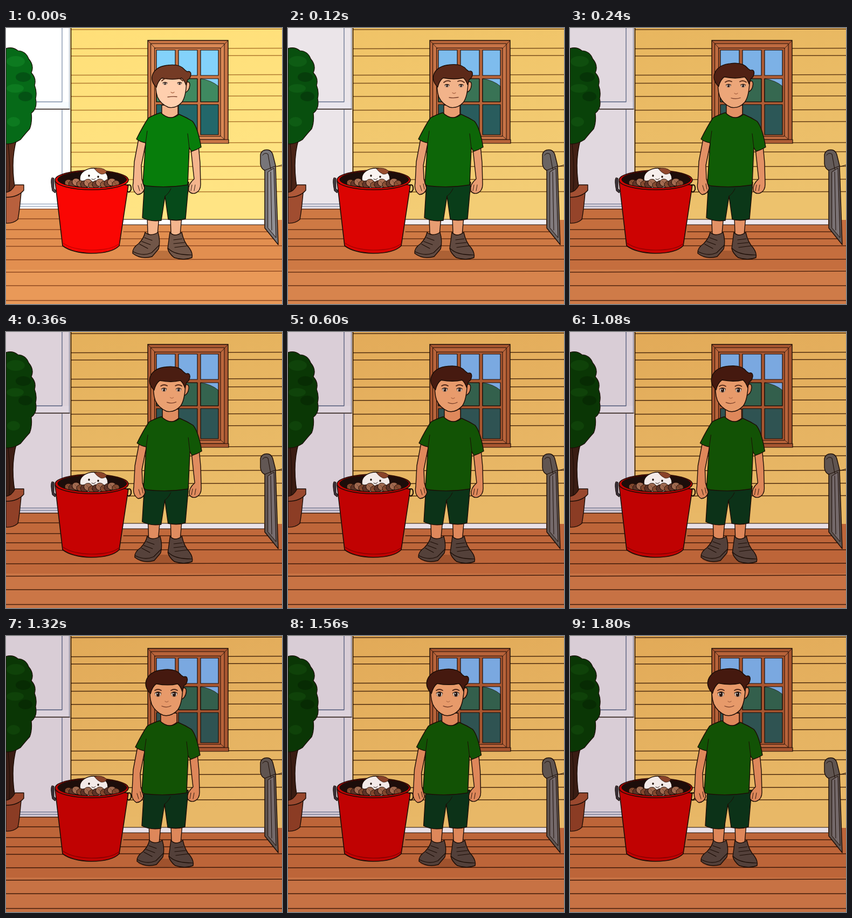
An HTML page with a canvas for the animation above (1920 ms loop, 512 by 512 pixels).

```html
<!DOCTYPE html>
<html lang="en">
<head>
<meta charset="utf-8">
<style>
  html, body { margin: 0; width: 100%; height: 100%; overflow: hidden; }
  canvas { display: block; width: 512px; height: 512px; }
</style>
</head>
<body>
<canvas id="stage" width="512" height="512"></canvas>
<script>
const start = performance.now();
const g = document.getElementById('stage').getContext('2d');
const INK = '#1c0d06', STEP = 120, COUNT = 16;
let step = 0, dusk = 0;

// Poses are given at these steps; a smooth curve runs through them.
const KEYS = [0, 1, 2, 5, 8, 11, 15];
const TRACKS = {
  headX:   [307, 306, 304.5, 303, 302, 298, 295],
  headW:   [1, 1.01, 1.03, 1.05, 1.06, 1.07, 1.09],
  headH:   [1, 1.01, 1.04, 1.07, 1.07, 1.08, 1.1],
  eyeL:    [295, 295, 294, 291, 284, 282, 280],
  eyeR:    [322, 321, 321, 318, 313, 312, 311],
  eyeY:    [103, 107, 107, 107, 107.5, 108, 108],
  eyeSize: [2, 2.2, 2.5, 3, 3.5, 3.8, 4],
  mouthX:  [309, 308, 308, 306, 299, 298, 296],
  mouthY:  [128, 129, 130, 131, 131, 130, 130],
  smile:   [-1, 1, 2, 3, 3, 3, 3],
  bodyX:   [0, 0, 1, 1, 0, -2, -5],
  shortsX: [0, 0, 0, -1, -1, -1, -2],
  shoeL:   [0, 0, 2, 7, 8, 8, 8],
  shoeR:   [0, 0, 0, 1, 1, 2, 2]
};

function at(name) {
  const v = TRACKS[name], last = KEYS.length - 1;
  let i = 0;
  while (i < last - 1 && step > KEYS[i + 1]) i++;
  const slope = j => {
    const a = Math.max(j - 1, 0), b = Math.min(j + 1, last);
    return (v[b] - v[a]) / (KEYS[b] - KEYS[a]);
  };
  const span = KEYS[i + 1] - KEYS[i], t = (step - KEYS[i]) / span, u = 1 - t;
  return v[i] * u * u * (1 + 2 * t) + v[i + 1] * t * t * (3 - 2 * t)
    + span * t * u * (slope(i) * u - slope(i + 1) * t);
}

// Blend from the bright to the dim version of a colour.
function tone(bright, dim) {
  const part = (hex, i) => parseInt(hex.substr(1 + 2 * i, 2), 16);
  return `rgb(${[0, 1, 2].map(i =>
    Math.round(part(bright, i) + (part(dim, i) - part(bright, i)) * dusk))})`;
}

function shape(d, fill, width = 1.4, ink = INK) {
  const p = new Path2D(d);
  if (fill) { g.fillStyle = fill; g.fill(p); }
  if (width) { g.lineWidth = width; g.strokeStyle = ink; g.stroke(p); }
}
const line = (d, ink = INK, width = 1.2) => shape(d, null, width, ink);

function rect(x, y, w, h, fill, width = 0, ink = INK) {
  shape(`M${x} ${y}h${w}v${h}h${-w}Z`, fill, width, ink);
}

function oval(x, y, rx, ry, fill, width = 0, turn = 0) {
  g.beginPath();
  g.ellipse(x, y, rx, ry, turn, 0, 7);
  g.fillStyle = fill;
  g.fill();
  if (width) { g.lineWidth = width; g.strokeStyle = INK; g.stroke(); }
}

function moved(dx, draw) {
  g.save();
  g.translate(dx, 0);
  draw();
  g.restore();
}

function house() {
  const wall = g.createLinearGradient(120, 0, 200, 360);
  wall.addColorStop(0, tone('#ffdf78', '#e2aa58'));
  wall.addColorStop(1, tone('#ffe484', '#e8b867'));
  rect(0, 0, 512, 365, wall);
  const seam = tone('#b07a30', '#4c2a0e');
  for (const y of [2.5, 38, 51.5, 87, 102, 126.5, 152, 174, 213, 230, 257, 281, 304])
    line(`M121 ${y + .5}L512 ${y - .5}`, seam, 1.3);

  rect(0, 0, 119, 336, tone('#ffffff', '#d9cdd6'));
  rect(0, 137, 118, 15, tone('#f8fcff', '#ddd3dc'));
  const edge = tone('#7d8ea8', '#4f5878');
  line('M104 0V137H0M104 152V327', edge, 1.3);
  line('M0 150.5H118M120.5 0V330', INK, 1.5);
  line('M117.5 0V150', edge, .8);
  rect(0, 327, 119, 9, tone('#f8fbff', '#d4cad4'));
  line('M25 326.5H119M25 331H119', edge, 1);
}

function deck() {
  rect(0, 336, 512, 176, tone('#e28f50', '#bd6539'));
  rect(0, 448, 512, 64, tone('#e99958', '#c77244'));
  rect(217, 336, 295, 20, tone('#ffe484', '#e8b867'));
  rect(478, 356, 34, 10, tone('#e28f50', '#bd6539'));
  rect(217, 355, 262, 10, tone('#ffffff', '#e9e0e6'));
  line('M217 355H479M217 365H479', INK, 1.2);
  const seam = tone('#8f4820', '#3f1a0a');
  line('M0 336H100M0 354H98M0 374H105M218 378H486M0 391H104M212 391H498M0 405H106M210 404H512M0 430L512 429M0 453L512 451M0 478H512M0 505.5H512', seam, 1.3);
}

function windowFrame() {
  const wood = tone('#c97545', '#a85630');
  rect(263, 23, 149, 190, wood, 1.4);
  rect(269, 29, 136, 178, tone('#d98855', '#b8633a'), 1);
  rect(276, 37, 122, 164, wood, 1);
  line('M263 23L277 38M412 23L398 38M263 213L277 200M412 213L398 200', INK, .8);
  rect(258, 207, 155, 7, wood, 1.2);
  const sky = tone('#83d2fb', '#7aa8e0');
  const hill = tone('#3f8960', '#335f4c');
  const low = tone('#22676a', '#2f5352');
  for (const [x, w] of [[279, 35], [320, 35], [361, 33]]) {
    rect(x, 41, w, 47, sky, 1.2);
    rect(x, 94, w, 43, sky);
    shape(x > 350 ? 'M361 94Q381 97 394 108V137H361Z' : `M${x} 94h${w}v43h${-w}Z`, hill, .7);
    rect(x, 94, w, 43, null, 1.2);
    rect(x, 142, w, 56, low, 1.2);
  }
}

function tree() {
  shape('M0 200L20 205Q13 230 13 255Q13 285 19 306H0Z', tone('#5c2d1c', '#3a1c13'));
  line('M4 215Q9 260 6 303', INK, 1);
  const clay = tone('#b8603d', '#8b3c24');
  shape('M0 306L28 306Q25 340 22 355Q13 363 0 362Z', clay);
  shape('M0 305Q10 304 17 291H33V301Q22 314 0 314Z', tone('#c76c45', '#99482e'));
  shape('M0 38Q12 34 22 42Q37 43 42 57Q53 70 47 83Q57 94 53 106Q58 119 55 131Q59 149 47 158Q49 174 44 187Q34 198 27 207Q13 216 0 215Z',
    tone('#066a18', '#0a3605'), 1.2);
  const leaf = tone('#0d7a20', '#0f4209'), shade = tone('#045214', '#072b03');
  [[18, 62, 17, 10], [32, 91, 14, 9], [17, 112, 16, 8], [36, 127, 13, 9], [14, 174, 12, 9]]
    .forEach(([x, y, a, b], i) => oval(x, y, a, b, i % 2 ? shade : leaf));
}

function gate() {
  line('M502 257L512 254', INK, 1);
  const steel = tone('#777579', '#5f5450');
  shape('M472 235Q474 226 484 226Q492 226 495 235L500 255L505 402L480 371V264Q473 261 472 252Z', steel);
  shape('M486 267L497 260L501 389L486 371Z', tone('#919095', '#74696a'), 1);
  line('M476 236Q480 230 486 234L491 262M480 264L500 256M491 267L493 375', INK, 1);
}

function bucket() {
  const red = tone('#fa0603', '#c00202');
  shape('M91 284L105 404Q122 417 158 418Q196 418 210 404L227 291Z', red, 1.6);
  line('M106 399Q122 411 158 412Q196 412 210 400', tone('#c00000', '#7c0000'), 1.2);
  oval(159, 282, 68, 18, red, 1.6);

  g.save();
  oval(160, 281, 64, 15.5, '#1d0d0a', 1);
  // Contents may rise above the rim but never spill over its front.
  g.clip(new Path2D('M96 240H224V281A64 15.5 0 0 1 96 281Z'));
  oval(163, 279, 26, 19, tone('#fffefa', '#f3eae8'), 1.3);
  shape('M164 261Q178 257 187 266Q184 272 176 271Q169 268 164 261Z', tone('#a85a36', '#8a432a'), .7);
  oval(154, 274, 1.7, 2, INK);
  oval(171, 276, 1.7, 2, INK);
  line('M159 280Q163 283 166 279', INK, 1);

  const nuts = [tone('#9a5c3e', '#84492f'), tone('#744030', '#5e3428'), tone('#b7785b', '#a06a50')];
  for (let i = 0; i < 13; i++) {
    const x = 116 + i * 7.3, y = 290 + 2 * Math.sin(i * 2.2) - Math.abs(i - 6) * .5;
    oval(x, y, 7, 6 + i % 3, nuts[i % 3], .9, i);
    line(`M${x - 3} ${y - 3}L${x + 2} ${y + 3}`, 'rgba(35,15,10,.5)', .8);
  }
  g.restore();
  line('M96 281A64 15.5 0 0 0 224 281', INK, 1);

  shape('M85 278Q82 282 86 302L91 306L93 302L89 298V279Z', tone('#474047', '#383038'), 1);
  line('M225 292Q233 288 232 300Q228 307 226 303', INK, 2);
}

function shoe(left) {
  const leather = tone('#715648', '#53403a');
  if (left) {
    shape('M258 379Q268 388 282 379Q287 396 283 410L271 424Q250 430 235 418Q234 408 246 400Q256 390 258 379Z', leather);
    line('M236 415Q254 424 270 417L284 403M257 389L271 394M252 396L268 402M248 401L263 409', INK, 1.2);
  } else {
    shape('M304 379Q313 389 326 379Q330 398 340 408Q347 418 345 426Q330 432 312 426Q302 418 300 409Z', leather);
    line('M301 409Q312 421 344 421M311 393L327 391M311 400L331 398M313 407L337 404', INK, 1.2);
  }
}

function boy() {
  const skin = tone('#f4b58d', '#de875a');
  const fair = tone('#ffcfae', '#e79a6a');
  oval(290, 421, 45, 8, 'rgba(70,25,8,.25)');
  moved(at('shoeL') * .4, () => shape('M262 350H284L281 383Q270 388 263 381Z', skin));
  moved(at('shoeR') * .5, () => shape('M305 350H326L323 384Q313 389 306 381Z', skin));
  moved(at('shoeL'), () => shoe(true));
  moved(at('shoeR'), () => shoe(false));

  moved(at('shortsX'), () => {
    shape('M257 286L253 352Q268 360 288 357L295 312L301 355Q318 359 333 354L339 286Z', tone('#064a1a', '#0c3218'));
    line('M295 312Q302 307 306 298', INK, 1);
  });

  moved(at('bodyX'), () => {
    shape('M246 206L238 248L236 287Q233 302 244 309Q255 308 257 297L252 280L251 255L260 210Z', skin);
    shape('M343 224L347 262L349 280Q337 290 339 302Q344 309 352 306Q361 302 361 290L360 250L357 218Z', skin);
    line('M245 292L248 302M251 289L253 299M345 291L343 302M351 291L349 302', INK, .9);
    shape('M289 143V160Q304 173 319 160V143Z', skin);
    shape('M287 157Q272 162 264 167Q254 182 242 206Q250 212 259 213L254 287Q254 292 262 293Q300 297 337 291L340 222L344 229Q354 226 362 221Q356 185 346 173Q335 166 321 160Q305 174 287 157Z',
      tone('#077d0b', '#125205'));
    line('M259 213L262 191M340 222L337 196', INK, 1);
  });
  head(skin, fair);
}

function head(skin, fair) {
  g.save();
  g.translate(at('headX'), 147);
  g.scale(at('headW'), at('headH'));
  g.translate(-307, -147);
  shape('M331 103Q341 96 341 106Q340 118 331 120Z', skin);
  shape('M279 95Q276 114 281 128Q287 141 301 147Q315 150 326 138Q334 128 335 98Q318 83 288 87Z', fair);
  shape('M279 110C270 101 269 92 273 84Q280 71 300 69Q323 66 332 78L336 81Q343 79 343 86Q342 94 337 96L334 106Q331 97 326 93Q310 97 289 93Q282 98 279 110Z',
    tone('#753b25', '#45190f'));
  g.restore();

  const y = at('eyeY'), r = at('eyeSize');
  for (const [x, side] of [[at('eyeL'), -1], [at('eyeR'), 1]]) {
    oval(x, y, r + 1.5, r * 1.15, '#fff3e6', .5);
    oval(x, y, r * .85, r * 1.1, '#2b1711');
    oval(x - r * .25, y - r * .35, r * .25, r * .25, '#fff');
    line(`M${x - r - 2} ${y - r * .5}Q${x} ${y - r * 1.7} ${x + r + 2} ${y - r * .5}`, INK, 1.1);
    const slope = 2 * side * (1 - dusk);
    line(`M${x - 6} ${y - 7 - slope}Q${x} ${y - 11} ${x + 6} ${y - 7 + slope}`, '#532817', 1.8);
  }
  const mx = at('mouthX'), my = at('mouthY'), smile = at('smile');
  line(`M${mx - 9} ${my}Q${mx} ${my + smile * 1.3} ${mx + 8} ${my - .5}`, '#743c28', 1.3);
  line(`M${mx - 3} ${my - 9}Q${mx} ${my - 6} ${mx + 3} ${my - 9}`, '#b06a48', 1.2);
}

function draw() {
  step = Math.floor((performance.now() - start) / STEP) % COUNT;
  dusk = 1 - Math.exp(-.75 * step);
  [house, deck, windowFrame, tree, gate, bucket, boy].forEach(part => part());
  requestAnimationFrame(draw);
}

g.lineJoin = g.lineCap = 'round';
draw();
</script>
</body>
</html>
```
